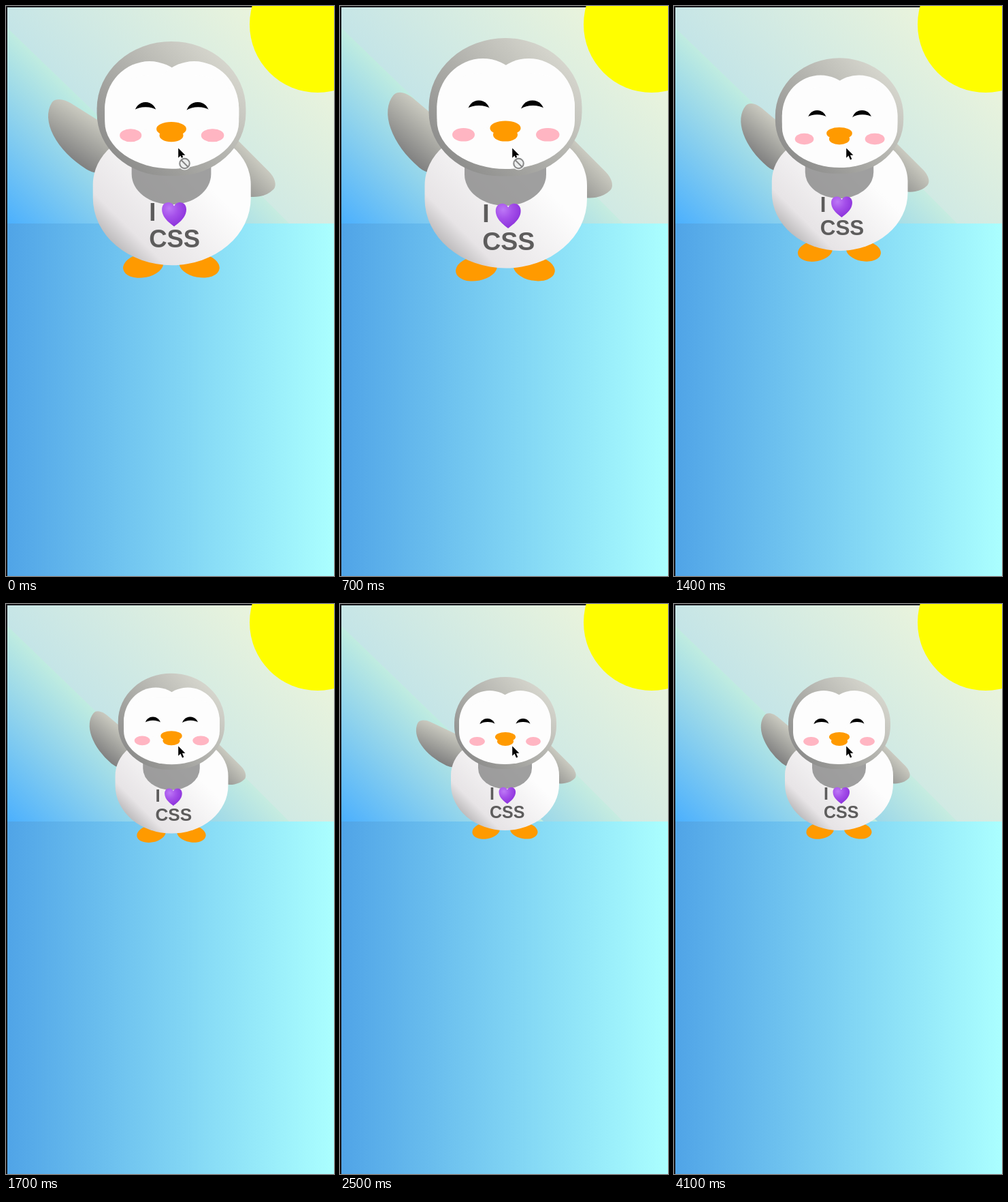
These frames come from a looping animation (482 px wide and 836 px high, 4200 ms). An HTML page:

```html
<!DOCTYPE html>
<html lang="en">
<head>
<meta charset="utf-8">
<title>Waving penguin</title>
<style>
:root { --skin: #808080; --face: #fdfdfd; --beak: #ff9a00; }
html, body { margin: 0; width: 100%; height: 100%; overflow: hidden; background: #15161a; }
.stage { position: relative; width: 482px; height: 836px; overflow: hidden; }
.stage * { position: absolute; }
.page { left: 2px; top: 2px; width: 481px; height: 909px;
  background: linear-gradient(45deg, rgb(112, 195, 255), rgb(245, 248, 217)); }

.back-mountain { width: 300px; height: 300px; left: 110px; top: 225px; transform: rotate(45deg);
  background: linear-gradient(rgb(198, 236, 224), rgb(45, 162, 255)); }
.sun { width: 200px; height: 200px; top: -75px; right: -75px; border-radius: 50%; background: #fffe00; }
.left-mountain { width: 300px; height: 300px; left: 0; top: 175px; transform: skew(0deg, 44deg);
  background: linear-gradient(rgb(192, 236, 224), rgb(70, 173, 255)); }
.ground { width: 100%; height: 534px; top: 317px;
  background: linear-gradient(90deg, rgb(80, 164, 231), rgb(171, 255, 255)); }

.penguin { width: 300px; height: 300px; left: 90.5px; top: 75px; transform: scale(1); }
.head { width: 50%; height: 45%; top: 10%; left: 25%; z-index: 1; border-radius: 70% 70% 65% 65%;
  background: linear-gradient(45deg, var(--skin), rgb(228, 228, 218)); }
.face { width: 60%; height: 70%; top: 15%; border-radius: 70% 70% 60% 60%; background: var(--face); }
.face.left { left: 5%; }
.face.right { right: 5%; }
.chin { width: 90%; height: 70%; top: 25%; left: 5%; border-radius: 70% 70% 100% 100%; background: var(--face); }
.eye { width: 15%; height: 17%; top: 45%; border-radius: 50%; background: #000; }
.eye.left { left: 25%; }
.eye.right { right: 25%; }
.lid { width: 150%; height: 100%; top: 25%; left: -23%; border-radius: 50%; background: var(--face); }
.blush { width: 15%; height: 10%; top: 65%; border-radius: 50%; background: #ffb5c2; }
.blush.left { left: 15%; }
.blush.right { right: 15%; }
.beak { height: 10%; border-radius: 50%; background: var(--beak); }
.beak.top { width: 20%; top: 60%; left: 40%; }
.beak.bottom { width: 16%; top: 65%; left: 42%; }

.shirt { z-index: 1; margin: 0; left: 127.5px; top: 188px; color: #5d5c5c;
  font: bold 25px/26.5px "Liberation Sans", Arial, sans-serif; }
.heart { z-index: 1; left: 140.1px; top: 191.2px; width: 25.6px; height: 25.6px; }

.body { width: 53%; height: 45%; top: 40%; left: 23.5%; border-radius: 80% 80% 100% 100%;
  background: linear-gradient(45deg, rgb(134, 133, 133), rgb(231, 228, 230) 25%, #fdfdfd 67%); }
.bib { width: 50%; height: 45%; top: 10%; left: 25%; border-radius: 0 0 100% 100%;
  background: var(--skin); opacity: .75; }
.arm { width: 30%; height: 60%; z-index: -1; border-radius: 30% 30% 30% 120%;
  background: linear-gradient(90deg, var(--skin), rgb(202, 202, 192)); }
.arm.left { top: 35%; left: 5%; transform-origin: top left; }
.arm.right { top: 0; right: -5%; transform: rotate(-45deg); }
.foot { width: 15%; height: 30%; top: 85%; z-index: -1; border-radius: 50%; background: var(--beak); }
.foot.left { left: 25%; transform: rotate(80deg); }
.foot.right { right: 25%; transform: rotate(-80deg); }

.cursor { left: 0; top: 0; }
</style>
</head>
<body>
<div class="stage">
  <div class="page">
    <div class="back-mountain"></div>
    <div class="sun"></div>
    <div class="left-mountain"></div>
    <div class="ground"></div>
    <div class="penguin" id="penguin">
      <div class="head">
        <div class="face left"></div>
        <div class="face right"></div>
        <div class="chin"></div>
        <div class="eye left"><div class="lid"></div></div>
        <div class="eye right"><div class="lid"></div></div>
        <div class="blush left"></div>
        <div class="blush right"></div>
        <div class="beak top"></div>
        <div class="beak bottom"></div>
      </div>
      <svg class="heart" viewBox="0 0 100 100">
        <radialGradient id="violet" cx=".3" cy=".25" r=".8">
          <stop offset="0" stop-color="#bd78f6"/>
          <stop offset=".45" stop-color="#a550ea"/>
          <stop offset="1" stop-color="#8a30da"/>
        </radialGradient>
        <path fill="url(#violet)" d="M50 98C40 89 2 66 2 31C2 12 14 3 27 3C38 3 46 9 50 18C54 9 62 3 73 3C86 3 98 12 98 31C98 66 60 89 50 98Z"/>
      </svg>
      <p class="shirt">I<br>CSS</p>
      <div class="body">
        <div class="bib"></div>
        <div class="arm left" id="arm"></div>
        <div class="arm right"></div>
        <div class="foot left"></div>
        <div class="foot right"></div>
      </div>
    </div>
  </div>
  <svg class="cursor" width="482" height="836">
    <path d="M253.2 208.5v14.3l3.3-3.2 2.5 5.8 2.3-1-2.4-5.6h4.5z" fill="#000" stroke="#fff" stroke-width="1.6" paint-order="stroke"/>
    <g id="denied">
      <circle cx="262.5" cy="231" r="9.6" fill="#f4f6f6"/>
      <circle cx="262.5" cy="231" r="7.2" fill="#eceeee" stroke="#858585" stroke-width="1.9"/>
      <path d="M257.5 226l10 10" stroke="#858585" stroke-width="1.9"/>
    </g>
  </svg>
</div>
<script>
const LOOP = 4200, STEP = 100;
const RELEASE = 907, WAVE_START = 2280, WAVE_PERIOD = 3000;
const byId = id => document.getElementById(id);
const penguin = byId("penguin"), arm = byId("arm"), denied = byId("denied");

const bezier = (s, a, b) => 3 * (1 - s) * (1 - s) * s * a + 3 * (1 - s) * s * s * b + s * s * s;

// cubic-bezier(.42, 0, .58, 1), solved by bisection
function easeInOut(x) {
  if (x <= 0) return 0;
  if (x >= 1) return 1;
  let lo = 0, hi = 1;
  for (let i = 0; i < 24; i++) {
    const mid = (lo + hi) / 2;
    if (bezier(mid, .42, .58) < x) lo = mid; else hi = mid;
  }
  return bezier(lo, 0, 1);
}

// Two swings of 20 degrees, 600 ms each, then rest
function armAngle(t) {
  const u = (t - WAVE_START + WAVE_PERIOD) % WAVE_PERIOD;
  if (u >= 1200) return 130;
  return 110 + 20 * Math.abs(u % 600 - 300) / 300;
}

function draw(t) {
  const grow = easeInOut((t + 800) / 1000);
  const shrink = easeInOut((t - RELEASE) / 1000);
  penguin.style.transform = `scale(${1 + .5 * (grow - shrink)})`;
  arm.style.transform = `rotate(${armAngle(t)}deg) scaleX(-1)`;
  denied.style.display = t < RELEASE ? "" : "none";
}

const start = performance.now();
function tick(now) {
  const t = Math.max(0, now - start) % LOOP;
  draw(Math.floor(t / STEP) * STEP);
  requestAnimationFrame(tick);
}
draw(0);
requestAnimationFrame(tick);
</script>
</body>
</html>
```
